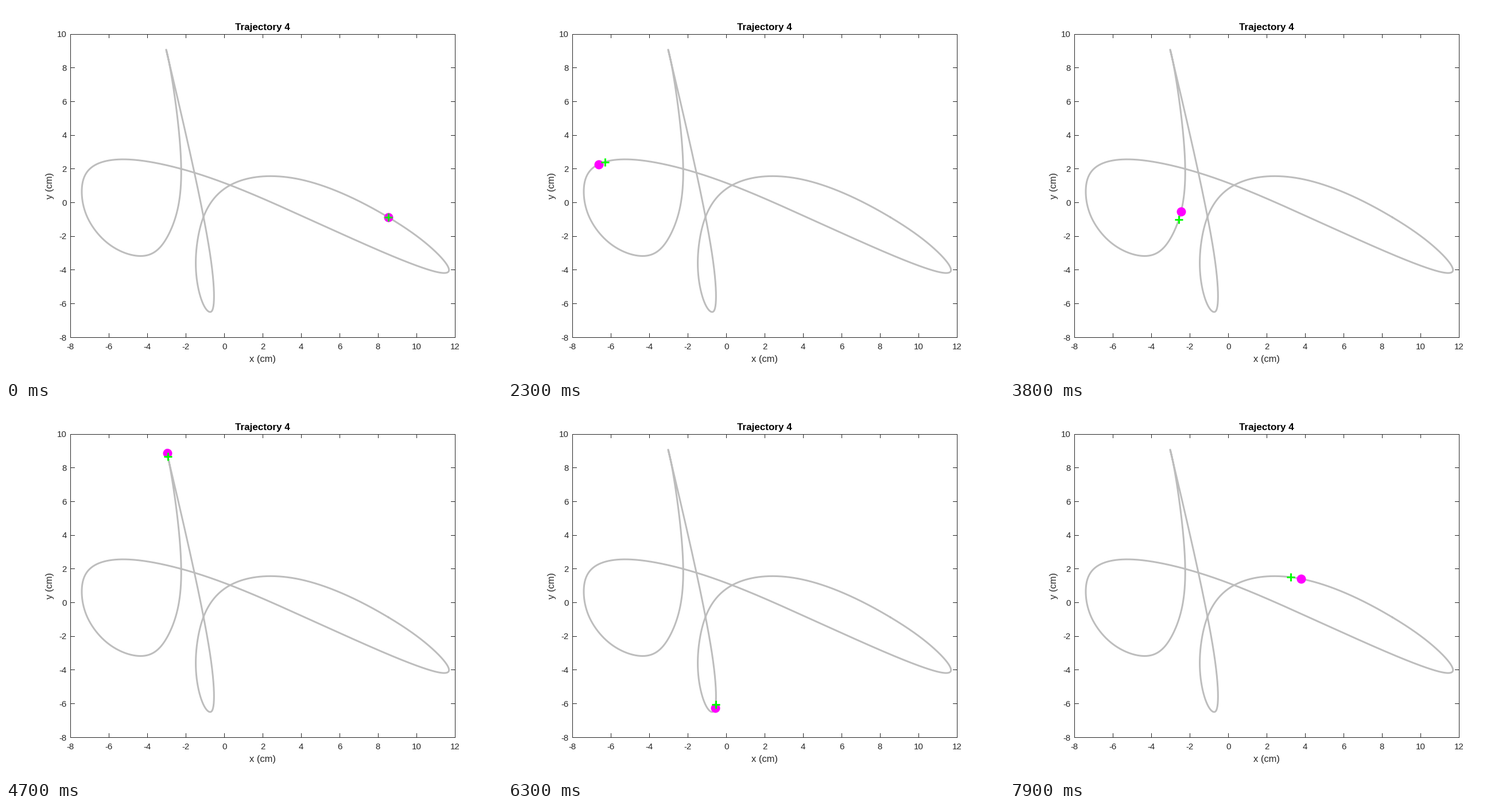
Write a matplotlib script that moves like this. It is 864x648 px and loops after 8000 ms.

```python
import numpy as np
import matplotlib.pyplot as plt
from matplotlib.animation import FuncAnimation
from matplotlib.patches import Rectangle

W, H, DPI = 864, 648, 72
FRAMES, STEP = 80, 100
LAP = 8.4      # seconds for one trip around the path
LAG = 0.055    # tracker delay in seconds
INK = "#262626"
LEFT, TOP, WIDTH, HEIGHT = 112.32, 48.6, 669.6, 528.12
RIGHT, BOTTOM = LEFT + WIDTH, TOP + HEIGHT

# Key poses of one lap: time, x, y
POSES = np.array([
    (0, 666, 368), (0.35, 740, 420.5), (0.68, 771.6, 460.5),
    (0.9, 747, 462.5), (1.1, 680, 438.5), (1.45, 505, 361),
    (1.8, 335, 292.5), (2.05, 226, 268.2), (2.3, 157.5, 275.8),
    (2.6, 132, 321), (2.8, 141.5, 367.5), (3.0, 174.5, 411),
    (3.28, 235, 435.5), (3.6, 280, 404), (3.8, 298, 358),
    (4.1, 304.6, 264), (4.5, 287.7, 118), (4.82, 279, 76),
    (5.1, 286, 106), (5.4, 309.8, 208), (5.9, 355.6, 433),
    (6.3, 360.7, 526), (6.46, 355.5, 533), (6.79, 337.7, 503),
    (7.05, 331, 433), (7.2, 339.5, 381), (7.5, 388, 313.5),
    (7.9, 507, 301),
])


def smooth_loop(poses, lap):
    """Closed cubic spline through the poses, as a function of time."""
    t, p = poses[:, 0], poses[:, 1:]
    n = len(t)
    h = np.diff(np.r_[t, t[0] + lap])[:, None]
    v = (np.roll(p, -1, axis=0) - p) / h
    a = np.zeros((n, n))
    for i in range(n):
        a[i, i - 1] = h[i - 1, 0]
        a[i, i] = 2 * (h[i - 1, 0] + h[i, 0])
        a[i, (i + 1) % n] = h[i, 0]
    m = np.linalg.solve(a, 6 * (v - np.roll(v, 1, axis=0)))

    def at(time):
        time = np.atleast_1d(time) % lap
        k = np.searchsorted(t, time, side="right") - 1
        j = (k + 1) % n
        f = (time - t[k])[:, None] / h[k]
        g = 1 - f
        bend = (g**3 - g) * m[k] + (f**3 - f) * m[j]
        return g * p[k] + f * p[j] + h[k]**2 / 6 * bend

    return at


path = smooth_loop(POSES, LAP)


def leader(t):
    return path(t)[0]


def tracker(t):
    """Follow late, and cut inside the first bend."""
    cut = np.exp(-((t - 1.05) / 0.25)**2)
    return leader(max(t - LAG, 0)) + cut * np.array([13, -19])


plt.rcParams["font.family"] = "Liberation Sans"
fig = plt.figure(figsize=(W / DPI, H / DPI), dpi=DPI, facecolor="white")
ax = fig.add_axes([0, 0, 1, 1])
ax.set_xlim(0, W)
ax.set_ylim(H, 0)
ax.axis("off")


def line(x, y):
    ax.plot(x, y, color=INK, lw=1, zorder=3)


def label(x, y, text, size, ha="center", color=INK, **kw):
    ax.text(x, y, text, fontsize=size, ha=ha, va="baseline",
            color=color, **kw)


ax.add_patch(Rectangle((LEFT, TOP), WIDTH, HEIGHT, fill=False,
                       ec=INK, lw=1, zorder=3))
tick = WIDTH / 100
for n in range(-8, 13, 2):
    x = LEFT + (n + 8) / 20 * WIDTH
    line([x, x], [BOTTOM, BOTTOM - tick])
    line([x, x], [TOP, TOP + tick])
    label(x, 598.5, str(n), 15)
for n in range(-8, 11, 2):
    y = BOTTOM - (n + 8) / 18 * HEIGHT
    line([LEFT, LEFT + tick], [y, y])
    line([RIGHT, RIGHT - tick], [y, y])
    label(105.5, y + 5.8, str(n), 15, ha="right")

mid = LEFT + WIDTH / 2
label(mid, 42.3, "Trajectory 4", 17, weight="bold", color="black")
label(mid, 620, "x (cm)", 16.5)
label(80.5, TOP + HEIGHT / 2, "y (cm)", 16.5, rotation=90,
      rotation_mode="anchor")

ax.plot(*path(np.linspace(0, LAP, 3000)).T, color="#bdbdbd", lw=3,
        solid_joinstyle="round", zorder=2)
dot, = ax.plot([], [], "o", color="magenta", ms=16, mew=0, zorder=5)
plus, = ax.plot([], [], "+", color="lime", ms=13.5, mew=3, zorder=6)


def draw(i):
    t = i * STEP / 1000
    for mark, (x, y) in ((dot, leader(t)), (plus, tracker(t))):
        mark.set_data([x], [y])
    return dot, plus


anim = FuncAnimation(fig, draw, frames=FRAMES, interval=STEP,
                     repeat=True, repeat_delay=0)
plt.show()
```
